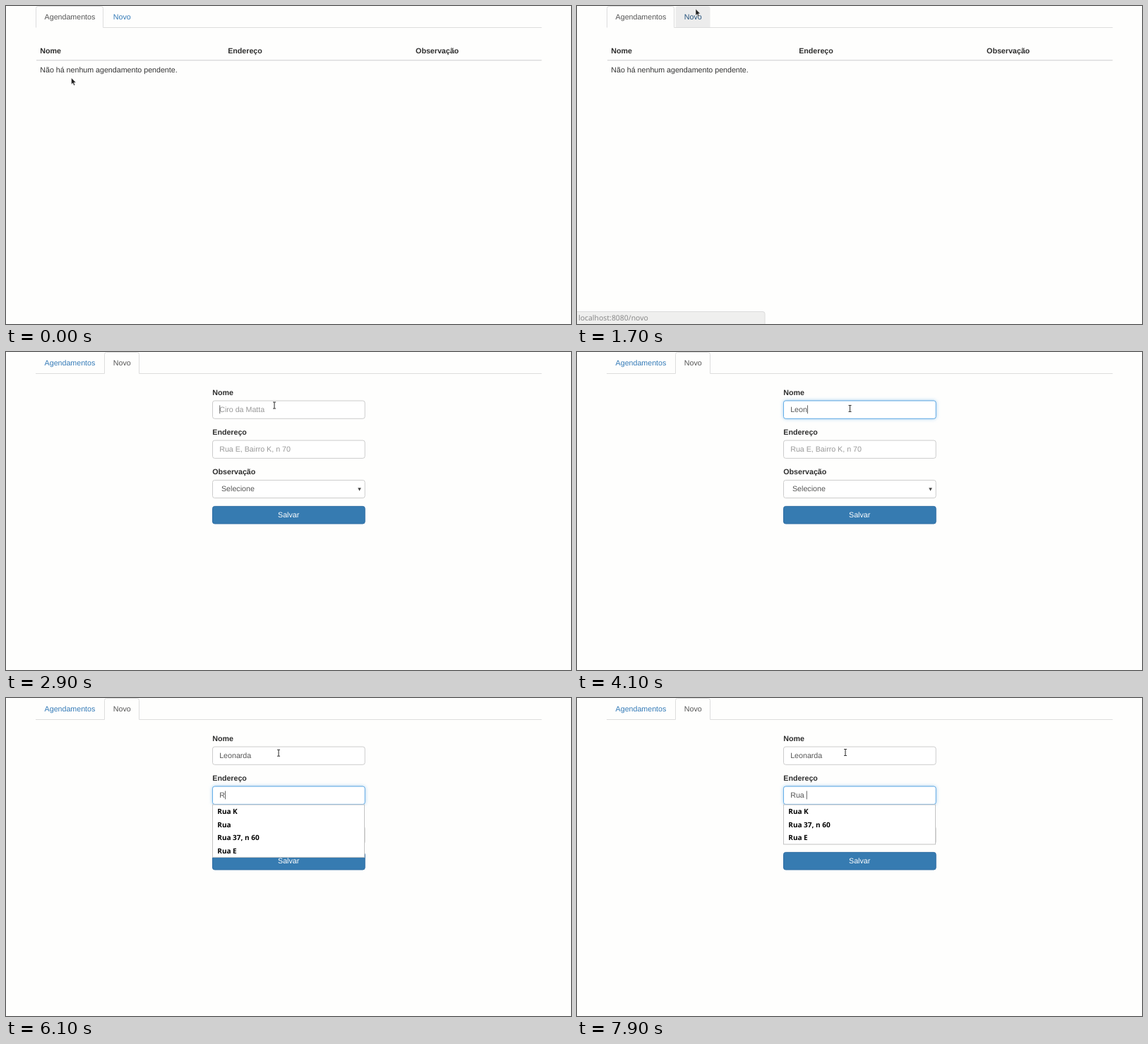
An HTML page for the animation above (8 s loop, 800 by 450 pixels).

```html
<!DOCTYPE html>
<html lang="pt-BR">
<head>
<meta charset="utf-8">
<title>Agendamentos</title>
<style>
  html, body { margin: 0; width: 100%; height: 100%; overflow: hidden; background: #fefefd; }
  svg { display: block; width: 800px; height: 450px; }
  text { font: 10.66px "Liberation Sans", Arial, sans-serif; fill: #333; white-space: pre; text-rendering: geometricPrecision; }
  .bold { font-weight: 700; fill: #2d2d2d; }
  .link { fill: #337ab7; }
  .hover .link { fill: #23527c; }
  .muted { fill: #555; }
  .hint { fill: #999; }
  .line { fill: none; stroke: #ddd; }
  .field { fill: #fff; stroke: #ccc; }
  .focus { fill: #fff; stroke: #66afe9; filter: drop-shadow(0 0 2.5px rgba(102, 175, 233, .6)); }
  .caret { fill: #555; }
  .menu text { font: 700 10px "Noto Sans", sans-serif; fill: #000; }
  .status text { font: 500 10.45px "Noto Sans", sans-serif; fill: #8a8a8a; }
</style>
</head>
<body>
<svg viewBox="0 0 800 450">
  <g id="list">
    <g id="newTab">
      <path id="tabFill" d="M139.5 30.5V3.5q0-3 3-3h43q3 0 3 3v27z" fill="#ececec"/>
      <text class="link" x="151.8" y="19">Novo</text>
    </g>
    <path class="line" d="M42.5 30.5V3.5q0-3 3-3h89q3 0 3 3v27H758.5"/>
    <text class="muted" x="54.6" y="19">Agendamentos</text>
    <g class="bold">
      <text class="bold" x="48.3" y="66.5">Nome</text>
      <text class="bold" x="314.2" y="66.5">Endereço</text>
      <text class="bold" x="580.1" y="66.5">Observação</text>
    </g>
    <path class="line" stroke-width="1.5" d="M43 76.7H758.5"/>
    <text x="48.3" y="94">Não há nenhum agendamento pendente.</text>
  </g>

  <g id="form">
    <path class="line" d="M42 30.5H139.5V3.5q0-3 3-3h43q3 0 3 3v27H758.5"/>
    <text class="link" x="54.6" y="19">Agendamentos</text>
    <text class="muted" x="151.8" y="19">Novo</text>
    <text class="bold" x="292.3" y="60.7">Nome</text>
    <text class="bold" x="292.3" y="117">Endereço</text>
    <text class="bold" x="292.3" y="173">Observação</text>
    <g id="name"></g>
    <g id="address"></g>
    <rect class="field" x="292.5" y="181.4" width="215.7" height="25.2" rx="3"/>
    <text class="muted" x="305" y="197.3">Selecione</text>
    <path d="M498.2 192.2h4.6l-2.3 4.6z" fill="#444"/>
    <rect x="292.5" y="218.4" width="215.7" height="24.6" rx="3" fill="#367bb1" stroke="#2e6da4"/>
    <text x="400.2" y="234" text-anchor="middle" style="fill:#fff">Salvar</text>
    <g id="menu" class="menu"></g>
  </g>

  <g id="status" class="status">
    <path d="M-1 451V432.5H263q3 0 3 3V451z" fill="#efefee" stroke="#dcdcdc"/>
    <text x="2" y="445.4">localhost:8080/novo</text>
  </g>

  <path id="arrow" d="M0 0V9.2L2.1 7.3 3.7 10.8 5.2 10.1 3.7 6.7 6.5 6.5z" fill="#222" stroke="#fff" stroke-width=".5"/>
  <g id="beam" fill="none">
    <path d="M-2-4.5H2M0-4.5V4.5M-2 4.5H2" stroke="#fff" stroke-width="2.2" opacity=".7"/>
    <path d="M-2-4.5H2M0-4.5V4.5M-2 4.5H2" stroke="#3a3a3a" stroke-width="1.1"/>
  </g>
</svg>
<script>
const LOOP = 8000, STEP = 100, BLINK = 600, FADE = 150;
const $ = id => document.getElementById(id);
const show = (el, on) => { el.style.display = on ? "" : "none"; };
const between = (t, a, b) => t >= a && t < b;
const clamp = v => Math.max(0, Math.min(1, v));

// time, x, y of the pointer
const path = [
  [0, 92.5, 101.7], [200, 97, 104], [500, 138, 78], [900, 181, 45],
  [1200, 175, 16], [1400, 165, 5], [1600, 165, 5], [1700, 168, 4.3], [1800, 168, 4.3],
  [2000, 178, 9], [2300, 288, 46], [2700, 380, 75.5], [3400, 380, 75.5],
  [3800, 388, 81], [4000, 387, 80.5], [4100, 386.5, 80], [4300, 380, 78],
  [5100, 380, 78], [5200, 380, 77], [5900, 380, 77],
  [6100, 386, 77.7], [6200, 387, 78], [6700, 387, 78], [6900, 380, 77]
];

const fields = [
  { box: $("name"), top: 69, hint: "Ciro da Matta", word: "Leonarda",
    keys: [3400, 3700, 4000, 4100, 4500, 4700, 4800, 5000], from: 2900, to: 5400 },
  { box: $("address"), top: 125.1, hint: "Rua E, Bairro K, n 70", word: "Rua ",
    keys: [6100, 6400, 6500, 6700], from: 5400, to: LOOP }
];
const options = ["Rua K", "Rua", "Rua 37, n 60", "Rua E"];

for (const f of fields) {
  const rect = cls => `<rect class="${cls}" x="292.5" y="${f.top}" width="215.7" height="25.3" rx="3"/>`;
  f.box.innerHTML = rect("field") + rect("focus") +
    `<text x="302.2" y="${f.top + 16.2}"></text>` +
    `<rect class="caret" y="${f.top + 6.4}" width=".9" height="11.8"/>`;
  [, f.glow, f.label, f.caret] = f.box.children;
}

function pointer(t) {
  const i = path.findIndex(p => p[0] > t);
  if (i < 0) return path[path.length - 1].slice(1);
  const [t0, x0, y0] = path[i - 1], [t1, x1, y1] = path[i];
  const k = (t - t0) / (t1 - t0);
  return [x0 + (x1 - x0) * k, y0 + (y1 - y0) * k];
}

const typed = (f, t) => f.word.slice(0, f.keys.filter(k => k <= t).length);

function drawField(f, t) {
  const value = typed(f, t);
  f.label.textContent = value || f.hint;
  f.label.setAttribute("class", value ? "muted" : "hint");
  f.glow.style.opacity = clamp((t - f.from) / FADE) - clamp((t - f.to) / FADE);
  const last = Math.max(f.from, ...f.keys.filter(k => k <= t));
  const lit = Math.floor((t - last) / BLINK) % 2 === 0;
  show(f.caret, between(t, f.from, f.to) && lit);
  f.caret.setAttribute("x", 302.3 + (value ? f.label.getComputedTextLength() : 0));
}

function drawMenu(query) {
  const rows = query ? options.filter(o => o.startsWith(query)) : [];
  $("menu").innerHTML = rows.length
    ? `<rect x="292.5" y="151" width="215" height="${rows.length * 18.4 + .8}" fill="#fff" stroke="#c4c4c4"/>` +
      rows.map((r, i) => `<text x="299.3" y="${164.4 + i * 18.4}">${r}</text>`).join("")
    : "";
}

function draw(t) {
  const onForm = t >= 2000, hover = between(t, 1100, 2000);
  show($("list"), !onForm);
  show($("form"), onForm);
  show($("tabFill"), hover);
  $("newTab").classList.toggle("hover", hover);
  show($("status"), between(t, 1200, 2300));
  if (onForm) {
    fields.forEach(f => drawField(f, t));
    drawMenu(typed(fields[1], t));
  }
  const [x, y] = pointer(t);
  const overInput = onForm && x > 292 && y > 69;
  for (const id of ["arrow", "beam"]) $(id).setAttribute("transform", `translate(${x} ${y})`);
  show($("arrow"), !overInput);
  show($("beam"), overInput);
}

const start = performance.now();
function tick() {
  const t = (performance.now() - start) % LOOP;
  draw(Math.floor(t / STEP) * STEP);
  requestAnimationFrame(tick);
}
tick();
</script>
</body>
</html>
```
